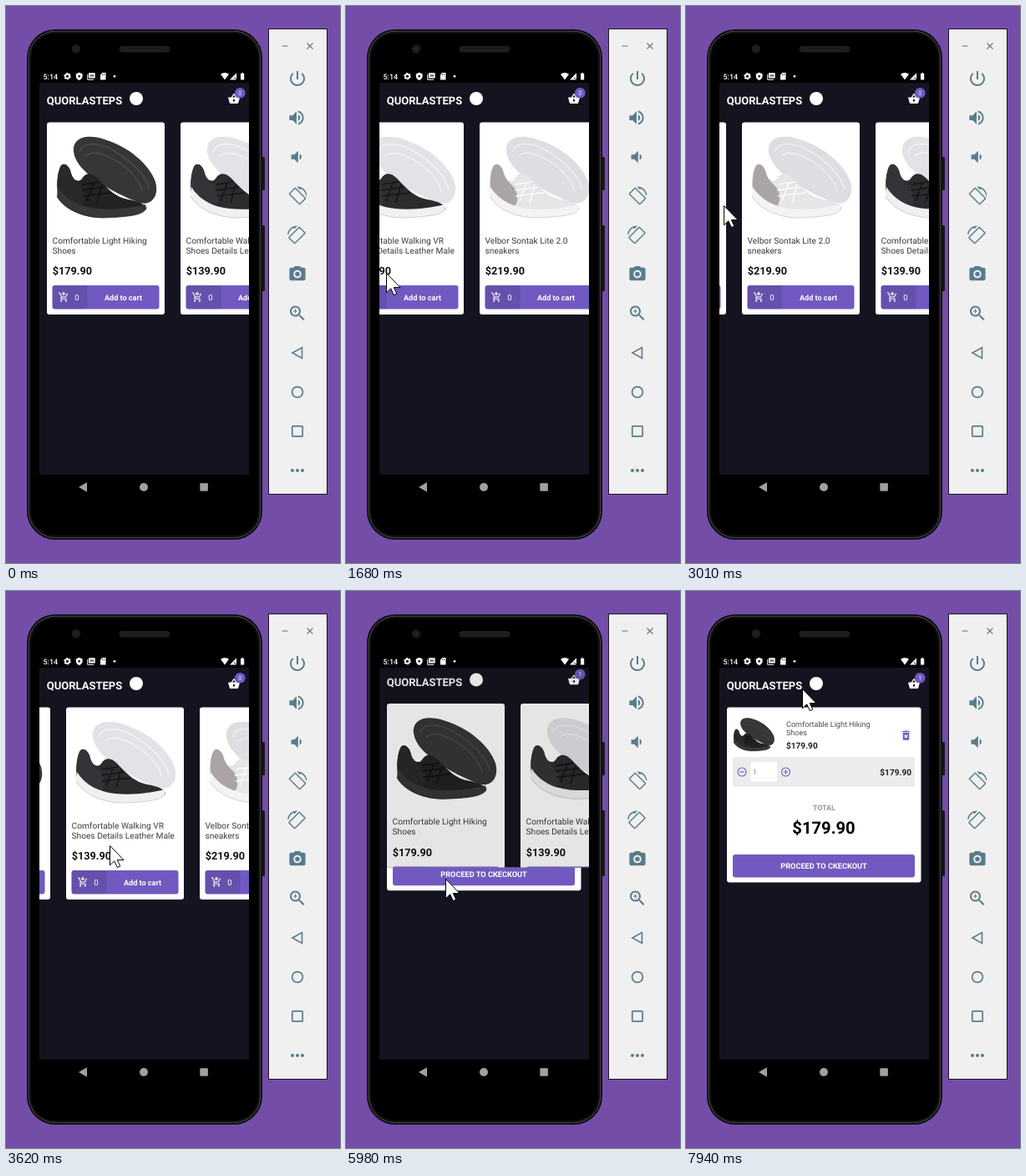
An HTML page that plays this animation: 400x668 px, repeating every 8000 ms.

```html
<!DOCTYPE html>
<html lang="en">
<head>
<meta charset="utf-8">
<title>Shoe shop on a phone</title>
<style>
html, body { margin: 0; width: 100%; height: 100%; overflow: hidden; background: #744da9; }
svg { display: block; width: 400px; height: 668px; font-family: Roboto, sans-serif; text-rendering: geometricPrecision; }
.bold { font-weight: 700; }
.mid { text-anchor: middle; }
.end { text-anchor: end; }
</style>
</head>
<body>
<svg id="stage" viewBox="0 0 400 668"></svg>
<script>
const PURPLE = '#7159c1', NIGHT = '#14131f', SLATE = '#587c8c';
const SCREEN = { x: 40, y: 92, w: 251, h: 470 };

const ICONS = {
  power: 'M13 3h-2v10h2V3zm4.83 2.17l-1.42 1.42C17.99 7.86 19 9.81 19 12c0 3.87-3.13 7-7 7s-7-3.13-7-7c0-2.19 1.01-4.14 2.58-5.42L6.17 5.17C4.23 6.82 3 9.26 3 12c0 4.97 4.03 9 9 9s9-4.03 9-9c0-2.74-1.23-5.18-3.17-6.83z',
  louder: 'M3 9v6h4l5 5V4L7 9H3zm13.5 3c0-1.77-1.02-3.29-2.5-4.03v8.05c1.48-.73 2.5-2.25 2.5-4.02zM14 3.23v2.06c2.89.86 5 3.54 5 6.71s-2.11 5.85-5 6.71v2.06c4.01-.91 7-4.49 7-8.77s-2.99-7.86-7-8.77z',
  quieter: 'M18.5 12c0-1.77-1.02-3.29-2.5-4.03v8.05c1.48-.73 2.5-2.25 2.5-4.02zM5 9v6h4l5 5V4L9 9H5z',
  rotate: 'M16.48 2.52c3.27 1.55 5.61 4.72 5.97 8.48h1.5C23.44 4.84 18.29 0 12 0l-.66.03 3.81 3.81 1.33-1.32zm-6.25-.77c-.59-.59-1.54-.59-2.12 0L1.75 8.11c-.59.59-.59 1.54 0 2.12l12.02 12.02c.59.59 1.54.59 2.12 0l6.36-6.36c.59-.59.59-1.54 0-2.12L10.23 1.75zm4.6 19.44L2.81 9.17l6.36-6.36 12.02 12.02-6.36 6.36z',
  camera: 'M9 2L7.17 4H4c-1.1 0-2 .9-2 2v12c0 1.1.9 2 2 2h16c1.1 0 2-.9 2-2V6c0-1.1-.9-2-2-2h-3.17L15 2H9zm3 15c-2.76 0-5-2.24-5-5s2.24-5 5-5 5 2.24 5 5-2.24 5-5 5zm0-8a3 3 0 1 0 .01 0z',
  zoom: 'M15.5 14h-.79l-.28-.27C15.41 12.59 16 11.11 16 9.5 16 5.91 13.09 3 9.5 3S3 5.91 3 9.5 5.91 16 9.5 16c1.61 0 3.09-.59 4.23-1.57l.27.28v.79l5 4.99L20.49 19l-4.99-5zm-6 0C7.01 14 5 11.99 5 9.5S7.01 5 9.5 5 14 7.01 14 9.5 11.99 14 9.5 14zm2.5-4h-2v2H9v-2H7V9h2V7h1v2h2v1z',
  basket: 'M17.21 9l-4.38-6.56c-.19-.28-.51-.42-.83-.42-.32 0-.64.14-.83.43L6.79 9H2c-.55 0-1 .45-1 1 0 .09.01.18.04.27l2.54 9.27c.23.84 1 1.46 1.92 1.46h13c.92 0 1.69-.62 1.93-1.46l2.54-9.27L23 10c0-.55-.45-1-1-1h-4.79zM9 9l3-4.4L15 9H9zm3 8c-1.1 0-2-.9-2-2s.9-2 2-2 2 .9 2 2-.9 2-2 2z',
  cart: 'M11 9h2V6h3V4h-3V1h-2v3H8v2h3v3zm-4 9c-1.1 0-1.99.9-1.99 2S5.9 22 7 22s2-.9 2-2-.9-2-2-2zm10 0c-1.1 0-1.99.9-1.99 2s.89 2 1.99 2 2-.9 2-2-.9-2-2-2zm-9.83-3.25l.03-.12.9-1.63h7.45c.75 0 1.41-.41 1.75-1.03l3.86-7.01L19.42 4h-.01l-1.1 2-2.76 5H8.53l-.13-.27L6.16 6l-.95-2-.94-2H1v2h2l3.6 7.59-1.35 2.45c-.16.28-.25.61-.25.96 0 1.1.9 2 2 2h12v-2H7.42c-.13 0-.25-.11-.25-.25z',
  trash: 'M6 19c0 1.1.9 2 2 2h8c1.1 0 2-.9 2-2V7H6v12zm2.46-7.12l1.41-1.41L12 12.59l2.12-2.12 1.41 1.41L13.41 14l2.12 2.12-1.41 1.41L12 15.41l-2.12 2.12-1.41-1.41L10.59 14l-2.13-2.12zM15.5 4l-1-1h-5l-1 1H5v2h14V4z'
};

const icon = (name, x, y, size, fill, flip = 1) =>
  `<path fill="${fill}" fill-rule="evenodd" transform="translate(${x} ${y}) scale(${flip * size / 24} ${size / 24}) translate(-12 -12)" d="${ICONS[name]}"/>`;
const text = (str, x, y, size, fill, cls = '') =>
  `<text x="${x}" y="${y}" font-size="${size}" fill="${fill}" class="${cls}">${str}</text>`;
const rect = (x, y, w, h, fill, r = 0, extra = '') =>
  `<rect x="${x}" y="${y}" width="${w}" height="${h}" rx="${r}" fill="${fill}" ${extra}/>`;
const circle = (x, y, r, fill, extra = '') =>
  `<circle cx="${x}" cy="${y}" r="${r}" fill="${fill}" ${extra}/>`;
const line = (d, stroke, width = 1) =>
  `<path d="${d}" fill="none" stroke="${stroke}" stroke-width="${width}"/>`;

// A pair of shoes: one seen from below, one from the side in front of it
const shoes = c => `
  <path fill="${c.under}" d="M81 175C79 157 98 153 118 160C146 168 172 190 179 211C184 229 173 240 160 236C128 224 84 200 81 175Z"/>
  ${line('M88 175C92 162 112 163 130 174C150 186 168 203 172 220M96 180C104 172 120 178 136 188C150 198 160 210 163 222', c.groove, 1.5)}
  <path fill="${c.upper}" d="M65 193C68 187 74 190 77 197C79 208 86 213 91 207C98 196 107 203 113 210C123 220 131 229 146 232C159 234 168 238 168 244C150 253 120 255 100 250C84 245 70 235 62 224C60 212 62 200 65 193Z"/>
  <path fill="${c.heel}" d="M65 193C68 187 74 190 77 197C80 212 90 214 93 222C96 232 93 238 90 241C76 235 66 228 62 220C61 210 62 200 65 193Z"/>
  ${line('M92 214L112 211M91 221L119 217M92 228L126 224M97 234L105 212M109 236L115 214', c.lace, 1.6)}
  <path fill="${c.sole}" d="M62 217C72 233 88 241 108 243C130 245 150 242 167 238C172 250 150 253 115 254C90 254 69 243 61 229Z"/>
  ${line('M61 228C70 243 90 253 115 254C150 253 168 250 168 241', c.edge, .8)}`;

const HIKING = { under: '#363638', groove: '#4b4b4e', upper: '#222224', heel: '#29292c', lace: '#111113', sole: '#37373a', edge: '#2b2b2e' };
const WALKING = { under: '#e3e3e7', groove: '#f3f3f5', upper: '#2c2c2f', heel: '#343438', lace: '#151517', sole: '#f0f0f2', edge: '#c6c6ca' };
const LIGHT = { under: '#dedde1', groove: '#efeff1', upper: '#e6e5e8', heel: '#aaa4a9', lace: '#fafafa', sole: '#f3f3f4', edge: '#c9c8cc' };
const walkingItem = [WALKING, 'Comfortable Walking VR', 'Shoes Details Leather Male', '$139.90'];
const ITEMS = [
  [HIKING, 'Comfortable Light Hiking', 'Shoes', '$179.90'],
  walkingItem,
  [LIGHT, 'Velbor Sontak Lite 2.0', 'sneakers', '$219.90'],
  walkingItem
];

const productCard = ([colors, top, bottom, price], i) => `
  <g transform="translate(${i * 160} 0)">
    ${rect(49, 139.5, 141, 230.5, '#fff', 3)}
    ${shoes(colors)}
    ${text(top, 55.5, 285, 10.2, '#3c3c3c')}
    ${text(bottom, 55.5, 297, 10.2, '#3c3c3c')}
    ${text(price, 55.7, 322.3, 12.7, '#111', 'bold')}
    <g id="add${i}">
      ${rect(55.5, 335, 128, 28.5, PURPLE, 3)}
      ${rect(55.5, 335, 42, 28.5, 'rgba(0,0,0,.1)', 3)}
      ${icon('cart', 69, 349, 13.5, '#fff')}
      ${text('0', 85, 352.8, 9.6, '#fff', 'mid')}
      ${text('Add to cart', 140.5, 352.6, 9.1, '#fff', 'bold mid')}
    </g>
  </g>`;

const header = (id, count) => `
  ${text('QUORLASTEPS', 48.8, 118.4, 13, '#fff', 'bold')}
  ${circle(156, 111, 8, '#fff')}
  ${icon('basket', 273, 111.3, 15, '#fff')}
  ${circle(280.3, 104.3, 6.3, PURPLE)}
  <text id="${id}" class="mid" x="280.3" y="107" font-size="7.5" fill="#e8e4f6">${count}</text>`;

const stepper = (x, d) =>
  circle(x, 217, 5, 'none', `stroke="${PURPLE}" stroke-width="1.1"`) + line(d, PURPLE, 1.1);

const background = rect(SCREEN.x, SCREEN.y, SCREEN.w, SCREEN.h + 12, NIGHT);

const home = `
  ${background}
  ${header('count', 0)}
  <g id="list">${ITEMS.map(productCard).join('')}</g>`;

const checkout = `
  ${background}
  ${header('paid', 1)}
  ${rect(49, 139.5, 232.5, 210, '#fff', 3)}
  <g transform="translate(57 151.5) scale(.41) translate(-61 -155)">${shoes(HIKING)}</g>
  ${text('Comfortable Light Hiking', 120, 163, 9.05, '#4a4a4a')}
  ${text('Shoes', 120, 173.4, 9.05, '#4a4a4a')}
  ${text('$179.90', 120, 189.3, 10.1, '#222', 'bold')}
  ${icon('trash', 263.5, 173, 15, PURPLE)}
  ${rect(56, 199, 218, 36, '#ececec', 3)}
  ${stepper(67, 'M64.4 217h5.2')}
  ${rect(77.5, 205, 31.5, 23.5, '#fff', 3)}
  ${text('1', 80, 220.3, 8.6, '#888')}
  ${stepper(119.5, 'M116.9 217h5.2M119.5 214.4v5.2')}
  ${text('$179.90', 270, 220.6, 10.1, '#222', 'bold end')}
  ${text('TOTAL', 165.3, 263.4, 8.9, '#999', 'bold mid')}
  ${text('$179.90', 165, 291, 20.2, '#000', 'bold mid')}
  ${rect(56, 316, 218, 27.5, PURPLE, 3)}
  ${text('PROCEED TO CKECKOUT', 165, 333, 9.2, '#fff', 'bold mid')}`;

const phone = `
  ${rect(304, 181, 6, 40, '#17171a', 1.5)}
  ${rect(304, 263, 6, 79, '#17171a', 1.5)}
  ${rect(25, 28, 282, 612, '#0b0b0c', 34)}
  ${rect(27.2, 30.2, 277.6, 607.6, '#111', 32, 'stroke="#4b4b4d"')}
  ${rect(30, 33, 272, 602, '#000', 29)}
  ${circle(84, 51.5, 4.5, '#19191c', 'stroke="#2a2a2e"')}
  ${circle(84, 51.5, 1.8, '#22263a')}
  ${rect(136, 48.5, 60, 6.5, '#1d1d1f', 3.2, 'stroke="#2b2b2d" stroke-width=".7"')}
  <path fill="#a0a0a0" d="M87 577L97 571.3V582.7Z"/>
  ${circle(165, 577, 5, '#a0a0a0')}
  ${rect(232.3, 572.2, 9.6, 9.6, '#a0a0a0', 1)}`;

const statusBar = `
  <text x="44.5" y="87.6" font-size="9" font-weight="500" fill="#fff">5:14</text>
  ${circle(73.5, 84.3, 2.5, 'none', 'stroke="#fff" stroke-width="1.8"')}
  ${circle(73.5, 84.3, 3.7, 'none', 'stroke="#fff" stroke-width="1.2" stroke-dasharray="2 1.87"')}
  <path fill="#fff" d="M87.7 79.8L91.6 81.4V84.2Q91.4 87.4 87.7 89Q84 87.4 83.8 84.2V81.4Z"/>
  ${circle(87.7, 84.3, 1.3, '#000')}
  ${line('M97.7 82v6.3h7.5', '#fff')}
  ${rect(99, 80.3, 7.7, 6.3, '#fff', .6)}${rect(100.3, 82.2, 5, 2.6, '#777')}
  <path fill="#fff" d="M113 82.5L115.3 80H119.5V88.6H113Z"/>
  ${line('M115.5 81.2v2M117.5 81.2v2', '#000', .7)}
  ${circle(130, 84.3, 1.4, '#fff')}
  <path fill="#fff" d="M257 81.8Q262 78.3 267 81.8L262 88.4ZM268 88.4H276V80.3Z"/>
  ${line('M273 85.5L276 88.5', '#000', 1)}
  <path fill="#fff" d="M281 81H282.2V80H284V81H285.2V88.6H281Z"/>`;

const toolbar = `
  ${rect(314.5, 27.5, 70, 558, '#f0f0f0', 0, 'stroke="#1b1424"')}
  ${line('M330.5 48h7M360.5 44.5l7 7M367.5 44.5l-7 7', '#67747a', 1.1)}
  ${icon('power', 349, 87, 24, SLATE)}
  ${icon('louder', 348, 134, 23, SLATE)}
  ${icon('quieter', 348, 181, 22, SLATE)}
  ${icon('rotate', 349, 228, 23, SLATE)}
  ${icon('rotate', 348.5, 275, 23, SLATE, -1)}
  ${icon('camera', 349, 321.5, 23, SLATE)}
  ${icon('zoom', 349, 368.5, 24, SLATE)}
  ${line('M343 416L354.5 409.5V422.5Z', SLATE, 1.6)}
  ${circle(349, 463, 6.4, 'none', `stroke="${SLATE}" stroke-width="1.7"`)}
  ${rect(342.8, 503.8, 12.4, 12.4, 'none', 1, `stroke="${SLATE}" stroke-width="1.7"`)}
  ${[343, 349, 355].map(x => circle(x, 557, 2, SLATE)).join('')}`;

const screenBox = (id, extra = '') =>
  `<clipPath id="${id}">${rect(SCREEN.x, SCREEN.y, SCREEN.w, SCREEN.h, '#fff', 0, extra)}</clipPath>`;

document.getElementById('stage').innerHTML = `
  <defs>${screenBox('screen')}${screenBox('reveal', 'id="window"')}</defs>
  ${rect(0, 0, 400, 668, '#744da9')}
  ${phone}${statusBar}
  <g clip-path="url(#screen)">
    <g id="home">${home}</g>
    ${rect(SCREEN.x, SCREEN.y, SCREEN.w, SCREEN.h, '#000', 0, 'id="shade"')}
    <g id="next" clip-path="url(#reveal)"><g id="checkout">${checkout}</g></g>
  </g>
  ${toolbar}
  <g id="pointer">
    ${circle(0, 0, 18, 'rgba(255,255,0,.47)', 'id="press"')}
    <path fill="#fff" stroke="#000" stroke-linejoin="round" d="M.5 .5V23.8L5.7 18.8L9.3 26.6L12.8 25L9.3 17.6H17Z"/>
  </g>`;

const el = {};
document.querySelectorAll('[id]').forEach(node => el[node.id] = node);

// Bursts of movement: start, end, number of pictures
const BURSTS = [
  [840, 1600, 11], [1680, 2330, 9], [2330, 2470, 3], [2550, 3090, 8],
  [3240, 3620, 6], [3620, 4030, 6], [4090, 4650, 8], [4880, 4880, 1], [5040, 5040, 1],
  [5280, 5430, 3], [5980, 6300, 5], [6990, 7770, 11], [7940, 7940, 1]
];
// Rows of time, x, y
const POINTER = [
  [0, -40, 516], [839, -40, 516], [840, -12, 516], [1000, 110, 430], [1140, 235, 330],
  [1230, 245, 322], [1600, 66, 320], [1680, 48, 320], [2000, 10, 305], [2330, -12, 287],
  [2470, -20, 285], [2550, -10, 285], [2780, 28, 132], [3090, 62, 345], [3240, 62, 345],
  [3400, 118, 312], [3620, 124, 305], [4030, 75, 131], [4300, 46, 240], [4570, 112, 350],
  [4650, 119, 345], [6950, 119, 345], [7250, 202, 300], [7500, 188, 180], [7770, 147, 123], [7940, 139, 117]
];
const SCROLL = [
  [0, 0], [1230, 0], [1600, 185], [1680, 209], [1840, 244], [2000, 270], [2170, 288],
  [2330, 298], [2470, 302], [3240, 302], [3400, 236], [3620, 137], [3800, 58], [3950, 12], [4030, 0]
];
const FADE = [[5040, .2], [5205, .2], [5430, 1]];
const PRESSES = [[1230, 1590], [3240, 3400], [4880, 5040]];

function snap(t) {
  let at = 0;
  for (const [a, b, n] of BURSTS) {
    if (t < a) break;
    const step = (b - a) / (n - 1) || 1;
    at = Math.min(b, a + Math.floor((t - a) / step + 1e-6) * step);
  }
  return at;
}

function tween(keys, t) {
  const i = keys.findIndex(k => k[0] > t);
  if (i < 0) return keys[keys.length - 1].slice(1);
  const [t0, ...from] = keys[i - 1], [t1, ...to] = keys[i];
  return from.map((v, j) => v + (to[j] - v) * (t - t0) / (t1 - t0));
}

const move = (node, x, y) => node.setAttribute('transform', `translate(${x} ${y})`);

function draw(time) {
  const t = snap(time);
  const open = t < 5980 ? 0 : t >= 6300 ? 1 : 1 - .51 * Math.exp((5980 - t) / 90);
  const below = SCREEN.h * (1 - open);

  move(el.pointer, ...tween(POINTER, t));
  move(el.list, -tween(SCROLL, t)[0], 0);
  el.press.style.display = PRESSES.some(([a, b]) => t >= a && t < b) ? '' : 'none';
  el.add0.style.opacity = t < 5040 ? 1 : tween(FADE, t)[0];
  el.count.textContent = open ? 1 : 0;

  move(el.home, 0, -.02 * SCREEN.h * open);
  el.shade.style.opacity = Math.min(.1, open * .28);
  el.next.style.display = open ? '' : 'none';
  el.window.setAttribute('y', SCREEN.y + below);
  move(el.checkout, 0, .041 * below);
}

const start = performance.now();
function tick() {
  draw((performance.now() - start) % 8000);
  requestAnimationFrame(tick);
}
tick();
</script>
</body>
</html>
```
